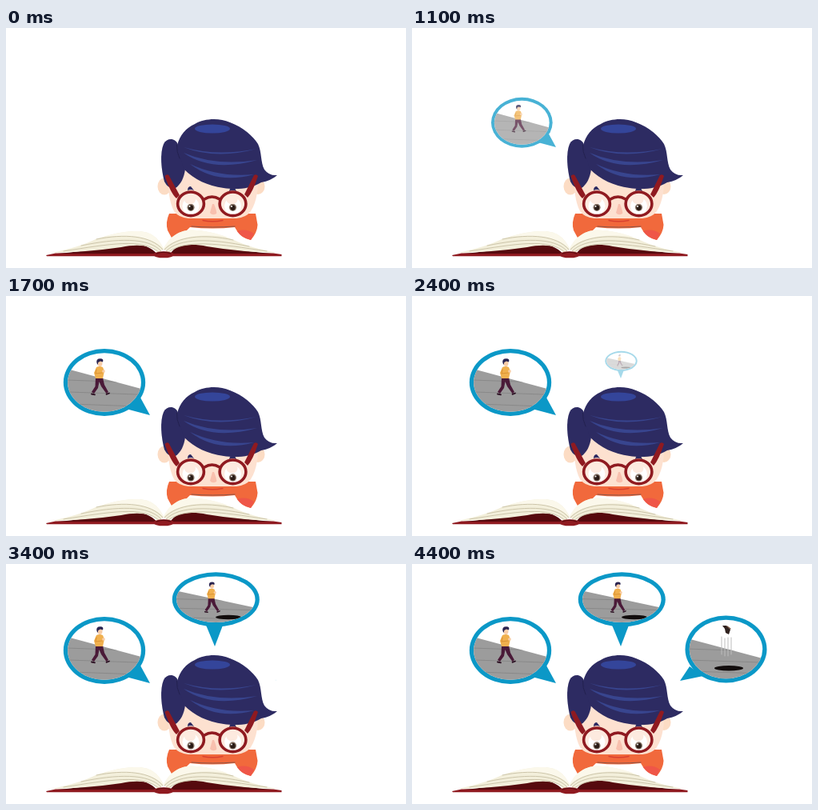
Write an HTML page with a canvas that moves like this. It is 500 by 300 pixels and loops after 5 s.

```html
<!DOCTYPE html>
<html>
<head>
<meta charset="utf-8">
<style>
html, body { margin: 0; width: 100%; height: 100%; overflow: hidden; background: #fff; }
canvas { display: block; width: 500px; height: 300px; }
</style>
</head>
<body>
<canvas id="stage" width="500" height="300"></canvas>
<script>
const ctx = document.getElementById('stage').getContext('2d');
const LOOP = 5000, STEP = 100, GROW = 900;
const BLUE = '#0b98c7', NAVY = '#2d2b62', STRAND = '#38458f', RED = '#8f1a20';
const SKIN = '#fde1d0', ORANGE = '#f1693c', CREAM = '#f3efdb', FLOOR = '#9c9c9c';

function fill(d, color) {
  ctx.fillStyle = color;
  ctx.fill(new Path2D(d));
}

function line(d, color, width = 1) {
  ctx.strokeStyle = color;
  ctx.lineWidth = width;
  ctx.stroke(new Path2D(d));
}

function oval(x, y, rx, ry, color) {
  ctx.beginPath();
  ctx.ellipse(x, y, rx, ry, 0, 0, Math.PI * 2);
  ctx.fillStyle = color;
  ctx.fill();
}

function ring(x, y, rx, ry, color, width) {
  ctx.beginPath();
  ctx.ellipse(x, y, rx, ry, 0, 0, Math.PI * 2);
  ctx.strokeStyle = color;
  ctx.lineWidth = width;
  ctx.stroke();
}

// Walking man; the origin is the middle of his head.
function man(x, y, size) {
  ctx.save();
  ctx.translate(x, y);
  ctx.scale(size, size);
  fill('M-5 19 L4 19 L6 28 L11 37 L8.5 39 L2 30 L-0.5 24 L-2 32 L-7 39 L-10 37 L-5.5 30 Z', '#4a1a38');
  line('M-10 39.5 L-6 40.3 M8.5 39.8 L12 38.5', '#2b1022', 1.8);
  fill('M-4 6 Q0 4 4 6 L6 11 L4 20 L-5 20 L-7 13 Z', '#f0b04e');
  line('M-4 9 L-5 14 L3 13', '#dc9334', 1.2);
  oval(5, 11, 1.9, 1.7, '#f8cda8');
  oval(0.5, 1, 3, 4, '#f8cda8');
  fill('M-3.5 1 Q-5 -4.8 1 -4.8 Q5.5 -4.8 4 -0.5 L1 -1.5 L-1.8 0 L-2.2 3 Z', '#2a2450');
  ctx.restore();
}

function ground(x0, y0, x1, y1, bottom) {
  const floor = `M${x0} ${y0} L${x1} ${y1} V${bottom} H${x0} Z`;
  fill(floor, FLOOR);
  ctx.save();
  ctx.clip(new Path2D(floor));
  const h = bottom - y0;
  for (const k of [0.24, 0.48, 0.72]) {
    const y = y0 + h * k;
    line(`M${x0} ${y} L${x1} ${y + h * 0.06}`, '#848484', 0.8);
  }
  ctx.restore();
}

const bubbles = [
  {
    start: 337, tip: [180, 149], x: 123, y: 108, rx: 51.2, ry: 42,
    tail: 'M150 141 L168 127 L180 149 Z',
    scene() {
      ground(72, 90, 176, 118, 152);
      man(117, 83, 1);
    }
  },
  {
    start: 1890, tip: [261, 103], x: 262.3, y: 44.3, rx: 54.5, ry: 34,
    tail: 'M249 74 L272 74 L261 103 Z',
    scene() {
      ground(206, 32, 318, 56, 80);
      oval(278, 66.5, 16, 2.8, '#120d0d');
      man(257, 26.5, 0.84);
    }
  },
  {
    start: 3300, tip: [335, 146], x: 392.5, y: 106.5, rx: 51, ry: 42,
    tail: 'M347 128 L364 140 L335 146 Z',
    scene() {
      ground(340, 92, 446, 120, 150);
      oval(396, 130.3, 18, 3.2, '#120d0d');
      line('M387 91 V113 M391 93 V115 M395 92 V115 M399 92 V113', '#bdbdbd', 1);
      fill('M388 77 L393 77 L398 82 L396 88 L392 86 L391 81 Z', '#30221f');
      line('M394 78 L398 81', '#6d4a35', 1.2);
    }
  }
];

function drawBubble(b, t) {
  if (t <= b.start) return;
  const s = Math.pow(Math.min(1, (t - b.start) / GROW), 1.75);
  const [px, py] = b.tip;
  ctx.save();
  ctx.translate(px, py);
  ctx.scale(s, s);
  ctx.translate(-px, -py);
  fill(b.tail, BLUE);
  oval(b.x, b.y, b.rx, b.ry, BLUE);
  ctx.save();
  ctx.beginPath();
  ctx.ellipse(b.x, b.y, b.rx - 5.3, b.ry - 5.3, 0, 0, Math.PI * 2);
  ctx.clip();
  ctx.fillStyle = '#fff';
  ctx.fillRect(b.x - b.rx, b.y - b.ry, b.rx * 2, b.ry * 2);
  b.scene();
  ctx.restore();
  // A white veil fades the whole bubble evenly.
  if (s < 1) {
    ctx.globalAlpha = 1 - s;
    ctx.fillStyle = '#fff';
    ctx.fillRect(b.x - 64, b.y - 64, 128, 128);
  }
  ctx.restore();
}

function drawEye(x, drop) {
  oval(x, 219.8, 15.5, 14, '#fdeadf');
  oval(x, 222.5, 10.5, 10.5, '#fff');
  oval(x, 224.3 + drop, 4.6, 4.6, '#8d7a6c');
  oval(x, 224.6 + drop, 3.2, 3.4, '#2a1c16');
  oval(x - 1.5, 223 + drop, 1, 1, '#fff');
  oval(x - 1, 214.5 + drop / 2, 7, 5.5, '#fdeadf');
  ring(x, 219.8, 16.4, 14.8, RED, 3.6);
}

function drawBoy(t) {
  const drop = 2.6 * Math.min(1, Math.max(0, (t - 1100) / 500));

  fill('M204 232 Q199 243 202 253 L208 264 Q219 261 230 249 Q258 252 286 249 Q292 262 306 265 Q314 256 314.5 246 L312 232 Z', ORANGE);
  fill('M289 254 Q300 250 310 257 L306 265 Q294 262 289 254 Z', '#ef5648');

  oval(198, 198, 8.5, 10.5, '#fcdcc4');
  oval(315, 198, 8.5, 10, '#fcdcc4');
  fill('M203 176 H315 Q317 212 306 229 Q300 237 288 238 H228 Q216 237 210 229 Q201 212 203 176 Z', SKIN);
  line('M232 248 Q258 250 286 248', '#8a5548', 1);
  line('M246 240.5 Q258 243 271 240.5', '#d9402f', 1.3);
  fill('M258 220 L260 220 Q264 230 263 232 Q258 235 255 231 Z', '#f8c0ae');

  fill('M227 203 Q227 198 231 198 L235 203 Q231 201 227 203 Z', NAVY);
  fill('M279 204 Q280 198 285 198 L288 204 Q283 202 279 204 Z', NAVY);

  // Hair: side lock, then the swept fringe.
  fill('M215 146 C212 137 201 137 197 145 C192 157 194 177 198 192 Q203 202 212 200 C218 196 223 187 224 176 Z', NAVY);
  fill('M214 147 C217 134 225 125 236 120 C248 113 266 112 280 118 C296 124 309 135 315 145 C320 155 318 168 323 177 Q329 185 339 184 Q331 191 319 193 C305 202 285 202 272 200 C252 197 236 190 222 176 Z', NAVY);
  oval(258, 126, 22, 5.5, '#34459a');
  fill('M222 149 Q263 165 313 151 Q264 161 222 149 Z', STRAND);
  fill('M222 156 Q257 181 314 165 Q262 173 222 156 Z', STRAND);
  fill('M230 170 Q264 196 310 183 Q266 187 230 170 Z', STRAND);
  line('M213.5 146 Q213 155 217 163', '#23214f', 1);

  drawEye(231, drop);
  drawEye(283.5, drop);
  line('M248 214 Q257.5 208 267 214', RED, 3.6);
  fill('M198.5 185 Q201 182 203.5 184 L217 209 L213 213 Q206 207 198.5 185 Z', RED);
  fill('M315 185 Q313 182 310 184 L298 208 L302 212 Q308 206 315 185 Z', RED);
}

function drawBook() {
  fill('M50 284 L62 281.5 H334 L344.5 283 V285.2 H51 Z', RED);
  fill('M64 282 Q112 278 138 271 Q176 266 189 283 H205 Q214 266 252 271 Q285 278 333 282 Z', '#560a0e');
  fill('M57 281 Q92 274 112 264 Q144 253 164 254 C182 254 191 263 197 276 L190 282 C183 271 164 270 144 274 Q103 280 57 281 Z', CREAM);
  fill('M340 281 Q305 275 285 265 Q256 253 232 252.5 C213 253 203 264 197 276 L204 282 C211 271 231 269 251 273 Q293 280 340 281 Z', CREAM);
  fill('M123 261 Q147 253 164 254 C182 254 191 263 197 276 C184 262 158 258 123 261 Z', '#fbf8eb');
  fill('M197 276 C203 264 213 253 232 252.5 Q255 253 276 261 C241 257 212 261 197 276 Z', '#fbf8eb');
  line('M113 264 C148 257 181 259 196 277 M94 272 C138 263 178 261 194 279 M72 279 C130 270 171 262 192 281', '#c8c0a4', 0.9);
  line('M284 265 C247 257 214 260 198 277 M304 273 C256 263 216 262 200 279 M326 279 C267 270 223 263 202 281', '#c8c0a4', 0.9);
  oval(197, 283.3, 13, 4, RED);
  line('M188 282 Q197 278.5 206 282', '#560a0e', 1.2);
}

function frame(now) {
  const t = Math.floor(now % LOOP / STEP) * STEP;
  ctx.fillStyle = '#fff';
  ctx.fillRect(0, 0, 500, 300);
  for (const b of bubbles) drawBubble(b, t);
  drawBoy(t);
  drawBook();
}

const origin = performance.now();
function tick() {
  frame(performance.now() - origin);
  requestAnimationFrame(tick);
}
ctx.lineCap = 'round';
ctx.lineJoin = 'round';
tick();
</script>
</body>
</html>
```
